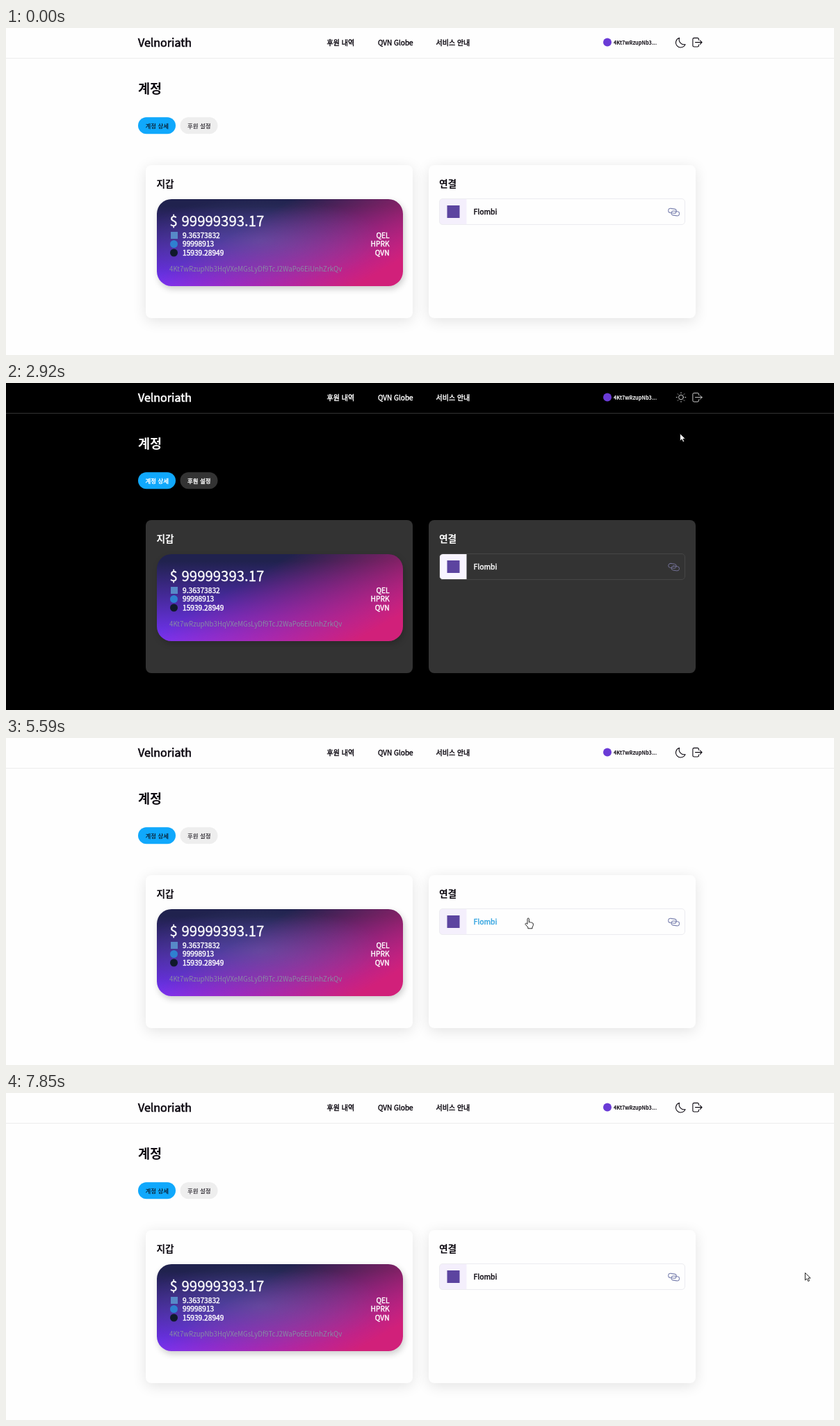
Recreate the animation shown at these times as an HTML page. Size 1191 px wide and 470 px high, loop 7.99 s.

```html
<!DOCTYPE html>
<html lang="ko">
<head>
<meta charset="utf-8">
<title>계정</title>
<style>
  html, body { margin: 0; width: 100%; height: 100%; overflow: hidden; }
  body {
    --bg: #fefefe; --ink: #0c0810; --line: #ececec; --pill: #eee; --card: #fefefe;
    --row: #ececf0; --tile: #f4effc; --link: #7c83b0; --shadow: #0000001c; --haze: #7078b060;
    --thin: 1.1; --label: .01em;
    position: relative; background: var(--bg); color: var(--ink);
  }
  body.dark {
    --bg: #000; --ink: #fff; --line: #333; --pill: #333; --card: #333;
    --row: #464646; --tile: #f8f4ff; --link: #7d7aa6; --shadow: #0000; --haze: #0000;
    --thin: .8; --label: .04em;
  }
  div { position: absolute; box-sizing: border-box; }
  .card {
    top: 197px; width: 384px; height: 220px; border-radius: 8px;
    background: var(--card); box-shadow: 0 4px 20px var(--shadow);
  }
  .wallet {
    left: 216.5px; top: 245.5px; width: 354px; height: 125.5px; border-radius: 21px;
    box-shadow: 2px 4px 10px #0003;
    background:
      radial-gradient(ellipse 50% 50% at 42% 48%, var(--haze), transparent),
      linear-gradient(330deg, #d1207a 12%, #d1207a00 66%),
      linear-gradient(#20224e 8%, #7433f8);
  }
  svg { position: absolute; left: 0; top: 0; display: block; }
  text {
    font-family: "Noto Sans CJK KR", "Noto Sans CJK JP", "Noto Sans", sans-serif;
    fill: currentColor; white-space: pre;
  }
  .mid { stroke: currentColor; stroke-width: .04em; }
  .label { stroke: currentColor; stroke-width: var(--label); }
  .bold { font-weight: 700; }
  .light { color: #fff; }
  .icon { fill: none; stroke: currentColor; stroke-width: var(--thin); stroke-linecap: round; stroke-linejoin: round; }
  .hover { color: #35a5e0; }
  #popup { filter: drop-shadow(0 1px 3px #0009); }
  #cursor { fill: #fff; stroke: #111; stroke-width: .9; stroke-linejoin: round; }
</style>
</head>
<body>
<div class="card" style="left:201.3px"></div>
<div class="card" style="left:608px"></div>
<div class="wallet"></div>

<svg width="1191" height="470" viewBox="0 0 1191 470">
  <path d="M0 43.5H1191" stroke="var(--line)"/>
  <text class="mid" x="190" y="27" font-size="16">Velnoriath</text>
  <g class="mid" font-size="10">
    <text x="461.5" y="25">후원 내역</text>
    <text x="535" y="25">QVN Globe</text>
    <text x="618.5" y="25">서비스 안내</text>
  </g>
  <circle cx="865" cy="20.5" r="6" fill="#6a3bd6"/>
  <text class="bold" x="874" y="23.5" font-size="7.3">4Kt7wRzupNb3...</text>

  <g id="toggle">
    <path id="moon" class="icon" d="M968.6 14.2A7 7 0 1 0 977 23.6A7.2 7.2 0 0 1 968.6 14.2Z"/>
    <g id="sun">
      <ellipse id="glow" cx="971" cy="22" rx="7" ry="8" fill="#8c9c26" stroke="#a89a2a" stroke-width="2" stroke-dasharray="2.5 1.5"/>
      <circle class="icon" cx="971" cy="20.5" r="3.4"/>
      <path id="rays" class="icon"/>
    </g>
  </g>
  <path class="icon" d="M996.5 17.3V16.2a1.8 1.8 0 0 0-1.8-1.8h-5a1.8 1.8 0 0 0-1.8 1.8v9a1.8 1.8 0 0 0 1.8 1.8h5a1.8 1.8 0 0 0 1.8-1.8V24M991.5 20.6H1001M998.3 17.8l2.8 2.8-2.8 2.8"/>

  <text class="bold" x="190" y="94" font-size="18.5">계정</text>
  <rect x="190" y="128.3" width="54" height="24" rx="12" fill="#10a8fc"/>
  <rect x="250.5" y="128.3" width="54" height="24" rx="12" fill="var(--pill)"/>
  <g class="label" font-size="8.5">
    <text x="200.5" y="143.5">계정 상세</text>
    <text x="261" y="143.5">후원 설정</text>
  </g>
  <g class="bold" font-size="13.7">
    <text x="216.5" y="228.5">지갑</text>
    <text x="623" y="228.5">연결</text>
  </g>

  <g class="light">
    <text x="235.5" y="285" font-size="20.4" stroke="#fff" stroke-width=".3">$ 99999393.17</text>
    <rect x="237" y="293" width="10" height="10" fill="#5789c8"/>
    <circle cx="241.5" cy="310.5" r="5.5" fill="#2f80d0"/>
    <circle cx="241.5" cy="323" r="5.5" fill="#101a2c"/>
    <g class="mid" font-size="10.2">
      <text x="254" y="302">9.36373832</text>
      <text x="254" y="314.3">99998913</text>
      <text x="254" y="326.8">15939.28949</text>
      <g text-anchor="end">
        <text x="551.5" y="302">QEL</text>
        <text x="551.5" y="314.3">HPRK</text>
        <text x="551.5" y="326.8">QVN</text>
      </g>
    </g>
  </g>
  <text x="235" y="350" font-size="9.7" style="color:#878ca4">4Kt7wRzupNb3HqVXeMGsLyDf9TcJ2WaPo6EiUnhZrkQv</text>

  <path d="M662.5 246H628a4.5 4.5 0 0 0-4.5 4.5V278a4.5 4.5 0 0 0 4.5 4.5h34.5Z" fill="var(--tile)"/>
  <rect x="623.5" y="245.5" width="353" height="37" rx="4.5" fill="none" stroke="var(--row)"/>
  <rect x="634.5" y="255" width="18" height="18" fill="#5c44a0"/>
  <text id="service" class="mid" x="672.5" y="268" font-size="10.4">Flombi</text>
  <g class="icon" style="color:var(--link)" transform="rotate(8 960.5 264.5)">
    <rect x="952.5" y="260" width="11.5" height="6.2" rx="3.1"/>
    <rect x="957.3" y="263" width="11.5" height="6.2" rx="3.1"/>
  </g>

  <g id="popup">
    <path d="M983 0H1191V281H983Z" fill="#222"/>
    <g id="content">
      <rect x="1063" y="-4" width="56" height="56" rx="13" fill="#121212"/>
      <rect x="995.5" y="112" width="191" height="74" rx="3" fill="#2a2a2a"/>
      <path d="M995.5 138.5H1186.5" stroke="#222"/>
      <circle cx="1171" cy="125.5" r="4.4" fill="#8a8a8a"/>
      <path d="M1171 124.8v3M1171 122.6v1" stroke="#2a2a2a" stroke-width="1.3"/>
      <path d="M983 233H1191V281H983Z" fill="#2a2a2a"/>
      <path d="M983 233.5H1191" stroke="#191919"/>
      <rect x="995.5" y="243" width="92.5" height="29" rx="3" fill="#333"/>
      <rect x="1094" y="243" width="92.5" height="29" rx="3" fill="#4e48cb"/>
    </g>
  </g>

  <g id="cursor">
    <path id="arrow" d="M.5 .5V11L3 8.8l1.8 3.8 1.8-.8L4.9 8H8.2Z"/>
    <path id="hand" d="M-1 1.2a1.2 1.2 0 0 1 2.4 0V6l1.2-.5 1 .7 1.2-.2.9.8 1 .1.6 1v2.6L6 13v1.8H-.2V13L-4 8.8a1.2 1.2 0 0 1 1.8-1.4L-1 8.5Z"/>
  </g>
</svg>

<script>
const LOOP = 7990;
const $ = id => document.getElementById(id);
const show = (id, on) => $(id).style.display = on ? "" : "none";

// Pointer path: time, x, y
const path = [
  [70, 1160, 436], [820, 983, 62], [890, 979, 56], [1300, 966, 21], [1440, 966, 20],
  [1900, 966, 20], [2310, 969, 76], [2780, 969, 76], [3530, 970, 36], [3800, 972, 23],
  [4340, 972, 23], [5190, 751, 262], [5460, 751, 262], [5590, 751, 259], [6000, 751, 259],
  [6470, 895, 124], [6860, 960, 140], [7380, 1149, 258], [LOOP, 1149, 258]
];

function pointerAt(t) {
  const i = Math.max(1, path.findIndex(p => p[0] > t));
  const [t0, x0, y0] = path[i - 1], [t1, x1, y1] = path[i];
  const k = Math.max(0, (t - t0) / (t1 - t0));
  const e = k * k * (3 - 2 * k);
  return [x0 + (x1 - x0) * e, y0 + (y1 - y0) * e];
}

$("rays").setAttribute("d", Array.from({ length: 8 }, (_, i) => {
  const c = Math.cos(i * Math.PI / 4), s = Math.sin(i * Math.PI / 4);
  return `M${971 + 5.8 * c} ${20.5 + 5.8 * s}L${971 + 6.8 * c} ${20.5 + 6.8 * s}`;
}).join(""));

function draw() {
  const t = performance.now() % LOOP;
  const dark = t >= 1770 && t < 4210;
  const [x, y] = pointerAt(t);
  const onToggle = y < 32;
  const onService = x < 977 && y > 246;

  document.body.classList.toggle("dark", dark);
  $("toggle").classList.toggle("hover", onToggle);
  $("service").classList.toggle("hover", onService);
  show("moon", !dark);
  show("sun", dark);
  show("glow", onToggle && t > 3600);

  show("popup", t >= 5790 && t < 7850);
  show("content", t >= 6200);
  $("popup").style.opacity = t < 7780 ? 1 : .5;

  show("cursor", t >= 70);
  show("hand", onToggle || onService);
  show("arrow", !onToggle && !onService);
  $("cursor").setAttribute("transform", `translate(${x} ${y})`);
  requestAnimationFrame(draw);
}
draw();
</script>
</body>
</html>
```
